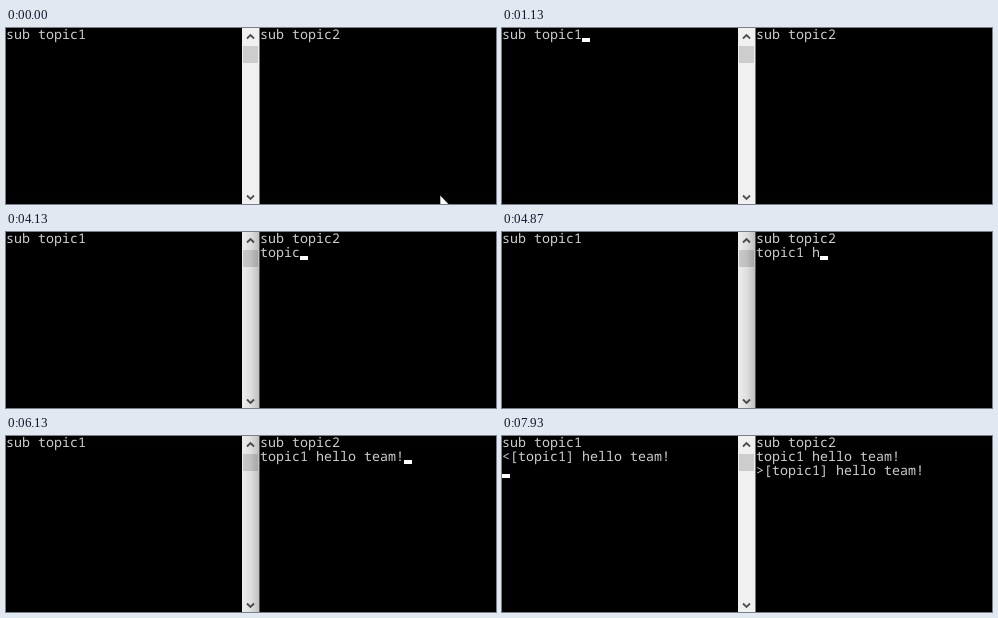
An HTML page for the animation above (8 s loop, 490 by 176 pixels).

```html
<!DOCTYPE html>
<html lang="en">
<head>
<meta charset="utf-8">
<title>Two consoles</title>
<style>
html, body { margin: 0; width: 100%; height: 100%; overflow: hidden; background: #000; }
svg { display: block; width: 100vw; height: 100vh; }
text { font: 13.333px "Noto Sans Mono", monospace; fill: #ccc; text-rendering: geometricPrecision; }
</style>
</head>
<body>
<svg viewBox="0 0 490 176">
  <defs>
    <linearGradient id="fade">
      <stop offset="0" stop-opacity=".01"/>
      <stop offset=".5" stop-opacity=".07"/>
      <stop offset="1" stop-opacity=".2"/>
    </linearGradient>
  </defs>
  <rect width="490" height="176"/>
  <g shape-rendering="crispEdges">
    <rect x="236" width="17" height="176" fill="#f0f0f0"/>
    <rect x="237" y="18" width="15" height="17" fill="#cdcdcd"/>
  </g>
  <path d="M241 10.5l3.5-3.5 3.5 3.5M241 167.500l3.5 3.500 3.5-3.500" fill="none" stroke="#505050" stroke-width="1.8"/>
  <rect id="shadow" x="236" width="17" height="176" fill="url(#fade)"/>
  <rect id="edge" x="253" width="1" height="176"/>
  <g id="lines"></g>
  <rect id="caret" width="8" height="4" fill="#fff"/>
  <path id="mouse" d="M0 0V16.500L3.800 13 6.300 18.500 8.700 17.500 6.300 12H11.500Z" fill="#fff" stroke="#000" stroke-width=".6"/>
</svg>
<script>
const LOOP = 8000, CELL = 8, ROW = 14, LEFT = 0, RIGHT = 254;
const TYPED = 'topic1 hello team!';
const KEYS = [3730, 3800, 4000, 4065, 4130, 4330, 4400, 4865, 4930,
  5070, 5130, 5330, 5400, 5470, 5530, 5600, 5730, 6130];
// Times at which the blinking caret is hidden while typing
const GAPS = [[3200, 3730], [4270, 4330], [4800, 4865], [5870, 6130], [6400, 6670]];

const $ = id => document.getElementById(id);

function addLine(x, row, str = '') {
  const el = document.createElementNS('http://www.w3.org/2000/svg', 'text');
  el.setAttribute('x', x);
  el.setAttribute('y', row * ROW + 11);
  el.textContent = str;
  $('lines').append(el);
  return el;
}

addLine(LEFT, 0, 'sub topic1');
addLine(RIGHT, 0, 'sub topic2');
const input = addLine(RIGHT, 1);
const sent = addLine(RIGHT, 2, '>[topic1] ' + TYPED.slice(7));
const received = addLine(LEFT, 1, '<[topic1] ' + TYPED.slice(7));

const within = (t, a, b) => t >= a && t < b;
const show = (el, on) => el.setAttribute('visibility', on ? 'visible' : 'hidden');

// Caret as [x, column, row], or null when hidden
function caretAt(t, count) {
  if (within(t, 1130, 1670)) return [LEFT, 10, 0];
  if (within(t, 1800, 2070)) return [LEFT, 0, 1];
  if (within(t, 2670, 6670)) {
    return GAPS.some(([a, b]) => within(t, a, b)) ? null : [RIGHT, count, 1];
  }
  if (within(t, 6670, 7330)) return [RIGHT, 0, 3];
  return t >= 7930 ? [LEFT, 0, 2] : null;
}

function mouseAt(t) {
  if (t < 70) return [434, 167];
  if (t < 130) return [412, 157];
  if (t < 270) return [391, 148];
  if (t >= 800) return null;
  const step = Math.floor((t - 270) / 66.3) + 1;
  const p = step / 8, e = p * p * (3 - 2 * p);
  return [391 - 243 * e, 148 - 146 * e];
}

function render(t) {
  const count = KEYS.filter(k => k <= t).length;
  input.textContent = TYPED.slice(0, count);
  show(sent, t >= 6670);
  show(received, t >= 6730);

  const caret = caretAt(t, count);
  show($('caret'), caret);
  if (caret) {
    const [x, col, row] = caret;
    $('caret').setAttribute('x', x + col * CELL);
    $('caret').setAttribute('y', row * ROW + 10);
  }

  const mouse = mouseAt(t);
  show($('mouse'), mouse);
  if (mouse) $('mouse').setAttribute('transform', `translate(${mouse})`);

  // The focused right window casts a shadow on the left one
  $('shadow').setAttribute('opacity', within(t, 2130, 7470) ? 1 : within(t, 2070, 2130) ? 0.5 : 0);
  $('edge').setAttribute('fill', within(t, 2070, 7330) ? '#555' : '#777');
}

function tick() {
  render(performance.now() % LOOP);
  requestAnimationFrame(tick);
}
tick();
</script>
</body>
</html>
```
